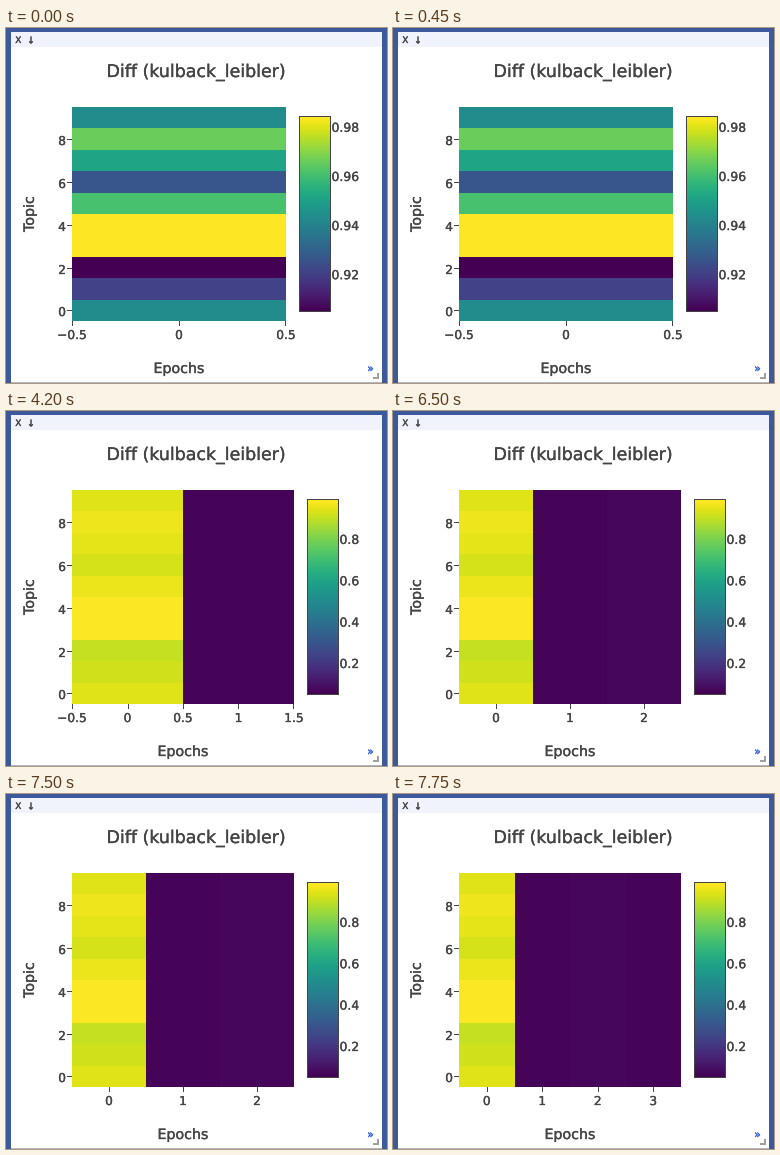
Animation of 381 by 355 pixels, one loop 8000 ms. Source, as a matplotlib script:

```python
import numpy as np
import matplotlib.pyplot as plt
from matplotlib.animation import FuncAnimation
from matplotlib.patches import Rectangle
from matplotlib.patheffects import withStroke

W, H, DPI = 381, 355, 64
STEP, FRAMES = 250, 32
TOP, BOTTOM, LEFT = 79, 293, 66
BAR_TOP, BAR_BOTTOM = 89, 283
ROW = (BOTTOM - TOP) / 10
INK = "#444444"
VIRIDIS = plt.get_cmap("viridis")

# First epoch, topics 0 to 9; the later epochs are almost flat.
FIRST = [0.943, 0.9205, 0.905, 0.984, 0.984, 0.961, 0.926, 0.951, 0.966, 0.943]
LOW, LIFTED = 0.058, 0.068

plt.rcParams["font.family"] = "DejaVu Sans"
plt.rcParams["text.hinting"] = "none"
plt.rcParams["toolbar"] = "None"
fig = plt.figure(figsize=(W / DPI, H / DPI), dpi=DPI, facecolor="white")
ax = fig.add_axes([0, 0, 1, 1])
ax.axis("off")


def rect(x0, y0, x1, y1, color):
    return ax.add_patch(Rectangle((x0, y0), x1 - x0, y1 - y0, facecolor=color,
                                  linewidth=0, antialiased=False))


def text(x, y, label, px, ha="center", color=INK, va="baseline", rotation=0):
    """Write a label with slightly thickened strokes."""
    return ax.text(x, y, label, fontsize=px * 72 / DPI, ha=ha, va=va,
                   color=color, rotation=rotation,
                   path_effects=[withStroke(linewidth=0.35, foreground=color)])


def window():
    rect(0, 0, W, H, "#3b599b")
    rect(5, 4, 376, 354, "white")
    rect(5, 4, 376, 19, "#f0f2fc")
    rect(5, 354, 376, 355, "#b4b8c4")
    text(12.3, 15, "X", 9)
    text(25, 15.5, "↓", 9.5)
    text(364.5, 344, "»", 11, color="#3565d8")
    rect(371, 345, 373, 351, "#a0a0a0")
    rect(367, 349, 373, 351, "#a0a0a0")
    text(190, 49, "Diff (kulback_leibler)", 17.4)
    text(24, 186, "Topic", 14.2, rotation=90, va="center")
    for topic in range(0, 10, 2):
        y = round(BOTTOM - (topic + 0.5) * ROW)
        rect(61, y, 66, y + 1, INK)
        text(60, y + 6, str(topic), 12.2, "right")


def color_bar(x, vmin, vmax, ticks):
    parts = [rect(x - 1, BAR_TOP - 1, x + 31, BAR_BOTTOM + 1, INK)]
    ramp = np.linspace(1, 0, BAR_BOTTOM - BAR_TOP)[:, None]
    parts.append(ax.imshow(ramp, cmap=VIRIDIS, aspect="auto", zorder=2,
                           interpolation="nearest",
                           extent=(x, x + 30, BAR_BOTTOM, BAR_TOP)))
    for tick in ticks:
        y = BAR_BOTTOM - (tick - vmin) / (vmax - vmin) * (BAR_BOTTOM - BAR_TOP)
        parts.append(text(x + 31.5, y + 5, f"{tick:g}", 12.4, "left"))
    return parts


def scene(right, later, xticks, vmin, vmax, bar_ticks):
    """Draw one state of the chart and return its artists."""
    parts = []
    columns = [FIRST] + [[v] * 10 for v in later]
    count = len(columns)
    xs = [int(LEFT + (right - LEFT) * i / count + 0.5) for i in range(count + 1)]
    ys = [round(BOTTOM - ROW * i) for i in range(11)]
    for i, column in enumerate(columns):
        for j, value in enumerate(column):
            color = VIRIDIS((value - vmin) / (vmax - vmin))
            parts.append(rect(xs[i], ys[j + 1], xs[i + 1], ys[j], color))

    for tick in xticks:
        x = LEFT + (right - LEFT) * (tick + 0.5) / count
        mark = min(round(x), right - 1)
        parts.append(rect(mark, BOTTOM, mark + 1, BOTTOM + 5, INK))
        label = f"{tick:g}".replace("-", "−")
        parts.append(text(x, 311, label, 12.2))
    parts.append(text((LEFT + right) / 2, 345, "Epochs", 14.2))
    return parts + color_bar(right + 14, vmin, vmax, bar_ticks)


window()
WIDE = (0.05, 0.988, (0.2, 0.4, 0.6, 0.8))
scenes = [
    (0, scene(280, [], (-0.5, 0, 0.5), 0.905, 0.984, (0.92, 0.94, 0.96, 0.98))),
    (750, scene(288, [LOW], (-0.5, 0, 0.5, 1, 1.5), *WIDE)),
    (6500, scene(288, [LOW, LIFTED], (0, 1, 2), *WIDE)),
    (7750, scene(288, [LOW, LIFTED, LOW], (0, 1, 2, 3), *WIDE)),
]
ax.set_xlim(0, W)
ax.set_ylim(H, 0)


def update(frame):
    now = frame * STEP
    current = max(start for start, _ in scenes if start <= now)
    for start, parts in scenes:
        for part in parts:
            part.set_visible(start == current)
    return []


anim = FuncAnimation(fig, update, frames=FRAMES, interval=STEP,
                     init_func=lambda: update(0), repeat=True, repeat_delay=0)
plt.show()
```
